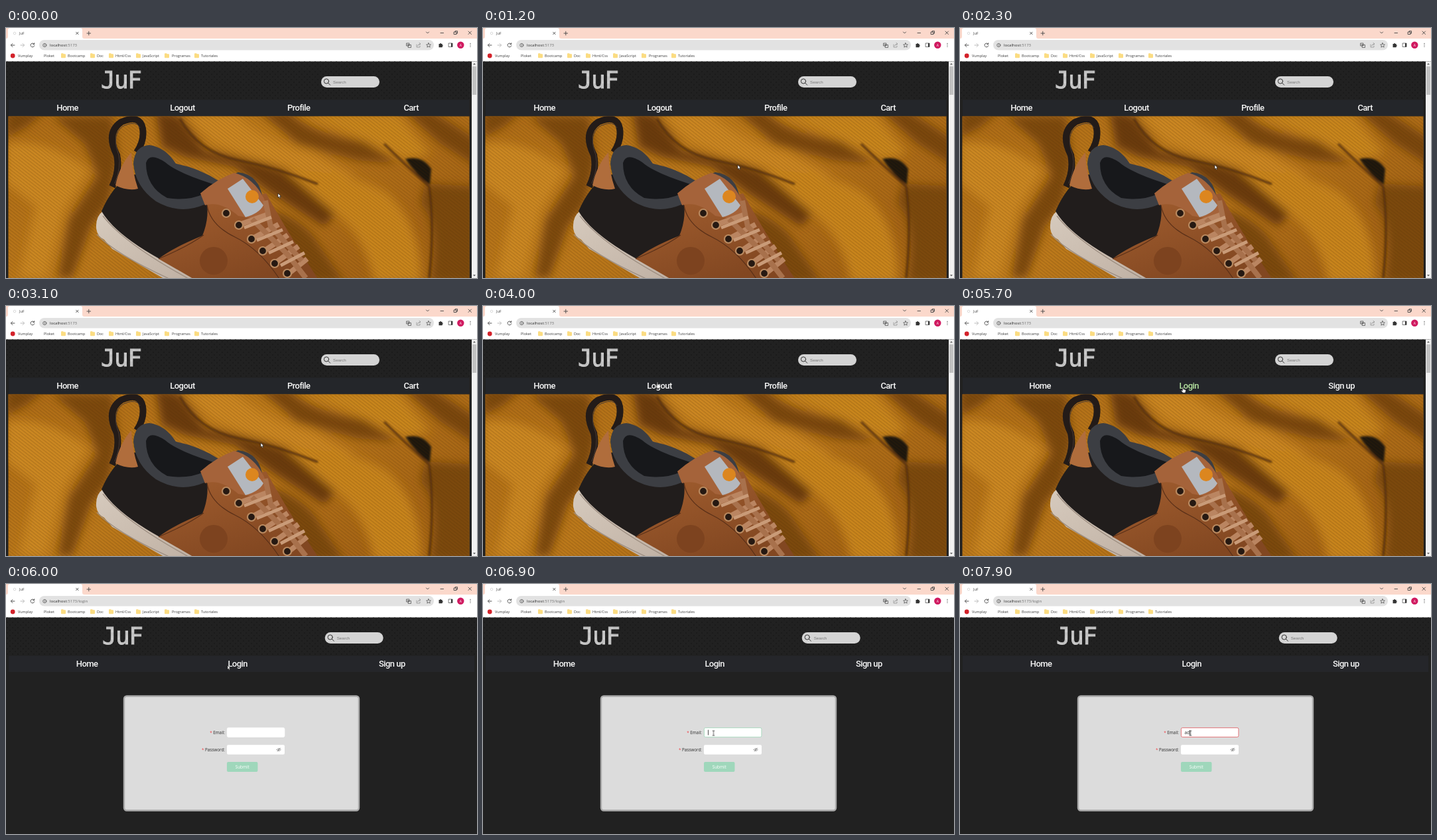
Write an HTML page that moves like this. It is 710x378 px and loops after 8 s.

```html
<!DOCTYPE html>
<html lang="en">
<head>
<meta charset="utf-8">
<title>JuF</title>
<style>
html, body { margin: 0; width: 100%; height: 100%; overflow: hidden; background: #212121; }
svg { display: block; width: 710px; height: 378px; }
text { font-family: "Open Sans", sans-serif; }
.ui { font-size: 5.5px; fill: #3c3c3c; }
.form { font-size: 6.3px; fill: #2b2b2b; }
.brand { font: 36px "DejaVu Sans Mono", monospace; letter-spacing: -1.6px; }
.nav text { font: 500 13px Roboto, sans-serif; letter-spacing: -.55px; fill: #f6f6f6; text-anchor: middle; }
.line { fill: none; stroke: #444; stroke-width: .9; stroke-linecap: round; stroke-linejoin: round; }

.step { animation: 8s step-end infinite; }
.home { animation-name: home; }
.login { animation-name: login; }
.member { animation-name: member; }
.guest { animation-name: guest; }
.arrow { animation-name: arrow; }
.hand { animation-name: hand; }
.beam { animation-name: beam; }
.caret { animation-name: caret; }
.one { animation-name: one; }
.two { animation-name: two; }
.field { animation-name: field; }
.nav .hover { animation: hover 8s step-end infinite; }
.pointer { animation: move 8s linear infinite; }

@keyframes home { 0% { opacity: 1 } 75%, 100% { opacity: 0 } }
@keyframes login { 0% { opacity: 0 } 75%, 100% { opacity: 1 } }
@keyframes member { 0% { opacity: 1 } 55%, 100% { opacity: 0 } }
@keyframes guest { 0% { opacity: 0 } 55%, 100% { opacity: 1 } }
@keyframes hover { 0% { fill: #f6f6f6 } 71.25%, 100% { fill: #b5e3a0 } }
@keyframes arrow {
  0% { opacity: 1 } 48.75% { opacity: 0 } 55% { opacity: 1 }
  71.25% { opacity: 0 } 75% { opacity: 1 } 83.75%, 100% { opacity: 0 }
}
@keyframes hand {
  0% { opacity: 0 } 48.75% { opacity: 1 } 55% { opacity: 0 }
  71.25% { opacity: 1 } 75%, 100% { opacity: 0 }
}
@keyframes beam { 0% { opacity: 0 } 83.75%, 100% { opacity: 1 } }
@keyframes caret { 0% { opacity: 0 } 86.25% { opacity: 1 } 92.5%, 100% { opacity: 0 } }
@keyframes one { 0% { opacity: 0 } 97.5%, 100% { opacity: 1 } }
@keyframes two { 0% { opacity: 0 } 98.75%, 100% { opacity: 1 } }
@keyframes field { 0% { stroke: #fff } 85% { stroke: #a5d8bd } 97.5%, 100% { stroke: #e0676d } }
@keyframes move {
  0%, 1.25% { transform: translate(410px, 250px); animation-timing-function: ease-in-out }
  11.25%, 41.25% { transform: translate(384px, 207px); animation-timing-function: ease-in-out }
  50%, 51.25% { transform: translate(263px, 115px) }
  52.5%, 60% { transform: translate(263px, 117px); animation-timing-function: ease-in-out }
  70%, 74.99% { transform: translate(336px, 122px) }
  75%, 76.25% { transform: translate(334px, 123px); animation-timing-function: ease-in-out }
  85%, 100% { transform: translate(347.5px, 225.5px) }
}
</style>
</head>
<body>
<svg viewBox="0 0 710 378">
<defs>
  <pattern id="dots" width="2.2" height="2.2" patternUnits="userSpaceOnUse">
    <path fill="#777" d="M0 0h2.2v2.2h-2.2z"/><path fill="#fff" d="M.2 .2h1.7v1.7h-1.7z"/>
  </pattern>
  <pattern id="weave" width="8" height="8" patternUnits="userSpaceOnUse">
    <path fill="#191919" d="M1 1h2v2h-2zM5 5h2v2h-2z"/>
  </pattern>
  <pattern id="cord" width="4" height="4" patternUnits="userSpaceOnUse" patternTransform="rotate(38)">
    <path fill="#4a2a04" d="M0 0h4v1.4h-4z"/>
  </pattern>
  <linearGradient id="cloth" x2="1" y2=".5">
    <stop offset="0" stop-color="#ae6c16"/><stop offset=".5" stop-color="#bd7a1b"/>
    <stop offset="1" stop-color="#a66515"/>
  </linearGradient>
  <linearGradient id="leather" x2=".6" y2="1">
    <stop offset="0" stop-color="#a35f30"/><stop offset="1" stop-color="#824721"/>
  </linearGradient>
  <linearGradient id="sole" x2="1" y2="1">
    <stop offset="0" stop-color="#d6cabd"/><stop offset="1" stop-color="#bfb0a3"/>
  </linearGradient>
  <filter id="soft" x="-30%" y="-30%" width="160%" height="160%"><feGaussianBlur stdDeviation="7"/></filter>
  <filter id="fine"><feGaussianBlur stdDeviation="1.5"/></filter>
  <clipPath id="frame"><path d="M3.5 133.5h695v245h-695z"/></clipPath>
  <path id="folder" fill="#fbdc82" d="M0 1q0-1 1-1h2l1 1h2q1 0 1 1v4q0 1-1 1H1q-1 0-1-1z"/>
  <text id="brand" class="brand" x="143" y="91" fill="url(#dots)" stroke="url(#dots)" stroke-width=".9">JuF</text>
  <g id="search">
    <rect x="475" y="73" width="88" height="17" rx="8.5" fill="#d4d4d4"/>
    <g class="line" style="stroke:#222"><circle cx="483" cy="80.5" r="3.6"/><path d="M485.7 83.2l3 3"/></g>
    <text x="493" y="83.6" fill="#777" style="font:6.2px 'Liberation Sans',sans-serif">Search</text>
  </g>
</defs>

<!-- browser -->
<path fill="#fbd8cb" d="M0 0h710v16H0z"/>
<path fill="#fff" d="M0 16q3 0 3-3V3q0-3 3-3h106q3 0 3 3v10q0 3 3 3h592v35H0z"/>
<circle cx="13" cy="8" r="1.8" fill="none" stroke="#ccc" stroke-width=".7"/>
<text class="ui" x="20" y="10">JuF</text>
<g class="line">
  <path d="M105.7 6.2l3.4 3.4m0-3.4l-3.4 3.4M122 8h5.6M124.8 5.2v5.6M633.5 6l2 2 2-2M655 7.5h4.5M697 5l4.5 4.5m0-4.5l-4.5 4.5M675.5 6h3.5v3.5h-3.5zM677 6V4.6h3.5v3.5H679"/>
  <path d="M13 26H7.5m2.4-2.5L7.4 26l2.5 2.5"/>
  <path stroke="#b5b5b5" d="M22 26h5.5m-2.4-2.5l2.5 2.5-2.5 2.5"/>
  <path d="M42.4 24.3a2.9 2.9 0 1 0 .4 2.4M42.7 22.7v2h-2"/>
</g>
<rect x="50" y="18" width="595" height="15.5" rx="7.7" fill="#e2e2e2"/>
<g class="line" style="stroke-width:.7">
  <circle cx="58.3" cy="26" r="2.6"/><path d="M58.3 25.8v1.4M58.3 24.4v.1"/>
  <path d="M604 23h4v4h-4zM606.5 25.5h4v4h-4zM605 25h2"/>
  <path stroke="#888" d="M619 25v4h5v-2M620.5 27q.5-3 4-3m-1.5-1.7l2 1.7-2 1.7"/>
  <path d="M637 22.7l1 2.2 2.4.2-1.8 1.6.6 2.4-2.2-1.3-2.2 1.3.6-2.4-1.8-1.6 2.4-.2z"/>
  <path d="M667.5 23h5.5v5.5h-5.5z"/>
</g>
<path fill="#333" d="M671 23h2v5.5h-2zM652.5 24h1.6a1 1 0 0 1 2 0h1.6v1.7a1 1 0 0 1 0 2v1.5h-5.2z"/>
<circle cx="685.3" cy="25.8" r="5.2" fill="#d01a60"/>
<text x="685.3" y="27.7" text-anchor="middle" font-size="5" fill="#fff">A</text>
<path class="line" style="stroke-width:1.3" d="M700 23.5v.01M700 25.8v.01M700 28.1v.01"/>
<text x="66" y="28.2" font-size="6.1" fill="#2d2d2d">localhost<tspan fill="#6d6d6d">:5173</tspan></text>
<text class="step login" x="107.2" y="28.2" font-size="6.1" fill="#6d6d6d">/login</text>
<circle cx="10.2" cy="42" r="3.4" fill="#d3222a"/>
<use href="#folder" x="83" y="38.3"/><use href="#folder" x="127" y="38.3"/><use href="#folder" x="155" y="38.3"/>
<use href="#folder" x="196" y="38.3"/><use href="#folder" x="239" y="38.3"/><use href="#folder" x="284" y="38.3"/>
<g class="ui">
  <text x="18" y="44">Vumplay</text><text x="57" y="44">Ploket</text><text x="93" y="44">Bootcamp</text>
  <text x="137" y="44">Doc</text><text x="165" y="44">Html/Css</text><text x="206" y="44">JavaScript</text>
  <text x="250" y="44">Programas</text><text x="294" y="44">Tutoriales</text>
</g>

<!-- page -->
<path fill="#212121" d="M0 50.5h710V378H0z"/>
<path fill="url(#weave)" opacity=".75" d="M0 50.5h710V108H0z"/>

<g class="step home">
  <use href="#brand"/><use href="#search"/>
  <path fill="#24262a" d="M4 108.5h694V133H4z"/>
  <g class="nav step member">
    <text x="92.7" y="124.5">Home</text><text x="266" y="124.5">Logout</text>
    <text x="441.2" y="124.5">Profile</text><text x="610.7" y="124.5">Cart</text>
  </g>
  <g class="nav step guest">
    <text x="120.7" y="124.5">Home</text><text class="hover" x="345.2" y="124.5">Login</text>
    <text x="575.2" y="124.5">Sign up</text>
  </g>

  <!-- photo: cloth -->
  <g clip-path="url(#frame)">
    <path fill="url(#cloth)" d="M3 133h696v245H3z"/>
    <g filter="url(#soft)">
      <path fill="#7d480f" d="M70 133L160 133 170 200 155 265 128 300 100 378H78L95 290 138 222 118 175zM0 125H60L30 150 0 165z"/>
      <path fill="#cc8822" d="M0 175Q60 165 125 215L88 275 60 378H20L45 270 0 235z"/>
      <path fill="#6b3a0c" d="M225 125L262 133 300 185 390 205 470 235 500 275 480 300 400 250 345 210 270 195 235 180z"/>
      <path fill="#cc8721" d="M268 130H345Q385 172 460 188L530 225 470 222 375 198 310 172z"/>
      <path fill="#7a470f" d="M380 125H425Q455 160 540 172L590 205 530 200 440 175zM600 125H640L720 175V215L655 175z"/>
      <path fill="#c9861f" d="M450 130H590L640 190 600 198 530 165z"/>
      <path fill="#c9851f" d="M420 215Q520 215 575 250Q628 300 625 385H555Q540 310 490 275z"/>
      <path fill="#7c4810" d="M400 275Q450 290 470 325L510 385H455L400 310zM632 235L710 240V385H640Q655 300 625 265z"/>
    </g>
    <g filter="url(#fine)">
      <path fill="#1f1811" d="M602 198Q628 192 641 213L639 237Q620 224 602 198z"/>
      <path fill="none" stroke="#542d08" stroke-width="3" d="M262 137Q290 188 350 200T470 236M570 175Q600 205 638 240Q646 300 638 378"/>
    </g>
    <path fill="url(#cord)" opacity=".2" d="M3 133h696v245H3z"/>

    <!-- photo: shoe -->
    <path fill="none" stroke="#231b18" stroke-width="10" d="M160 240Q172 215 167 192Q150 158 174 142Q202 130 206 152Q209 170 197 188"/>
    <path fill="none" stroke="#4a3a31" d="M164 235Q174 210 170 192Q158 161 177 148Q197 139 202 151"/>
    <path fill="url(#sole)" d="M146 277Q135 285 136 302Q137 315 148 320L160 334 238 379H300L244 350 176 300z"/>
    <path fill="none" stroke="#9c8d80" stroke-width="1.3" d="M137 312Q165 342 246 379M146 284Q177 325 275 379"/>
    <path fill="#211d1c" d="M186 222Q160 240 144 277Q166 315 246 357L300 330 318 263 220 220z"/>
    <path fill="url(#leather)" d="M303 266L340 262 392 250Q425 310 470 379H282L230 349Q250 333 296 314Q306 290 303 266z"/>
    <path fill="none" stroke="#5a3018" stroke-width="1.3" d="M303 268Q308 298 345 316T412 379M230 349Q275 330 298 313"/>
    <path fill="#b06d3c" d="M189 188Q171 208 165 238Q184 247 199 243Q190 217 189 188z"/>
    <path fill="#3c3e43" d="M192 205Q194 178 216 177Q240 180 256 205Q292 212 322 232L350 218Q382 222 387 258L366 250 330 256 299 267Q262 283 226 262Q195 240 192 205z"/>
    <path fill="#17181b" d="M211 204Q216 187 240 203Q258 219 312 236L322 243 298 251Q274 262 243 257Q211 240 211 204z"/>
    <path fill="#a5633a" d="M293 250Q318 228 344 219Q373 226 389 258L399 293 350 284Q323 261 300 268z"/>
    <path fill="#b4b8be" d="M334 243L357 228 388 268Q382 280 361 286z"/>
    <circle cx="371" cy="255" r="10" fill="#dc861f"/>
    <circle cx="313" cy="352" r="21" fill="#7d431f"/>
    <g fill="none" stroke="#ba8561" stroke-width="8" stroke-linejoin="round">
      <path d="M350 298L397 281M370 319L411 297M389 337L425 313M406 355L441 330M424 373L454 349"/>
      <path d="M391 261L399 300 446 352M371 289L424 342 452 378" stroke="#a8714c"/>
      <path d="M359 302L400 286M378 321L417 305M396 340L433 323M414 359L450 340" stroke="#c99b78" stroke-width="5"/>
    </g>
    <g fill="#261912" stroke="#b98a60" stroke-width="2.2">
      <circle cx="332" cy="280" r="6"/><circle cx="351" cy="298" r="6"/><circle cx="370" cy="319" r="6"/>
      <circle cx="387" cy="337" r="6"/><circle cx="405" cy="356" r="6"/><circle cx="424" cy="371" r="6"/>
    </g>
  </g>

  <path fill="#f1f1f1" d="M702 50.5h8V378h-8z"/>
  <path fill="#c1c1c1" d="M703 58h6v43h-6z"/>
  <path fill="#666" d="M704 55.5h4l-2-2.5zM704 373h4l-2 2.5z"/>
</g>

<g class="step login">
  <use href="#brand" x="2"/><use href="#search" x="5.7"/>
  <path fill="#25262a" d="M4 108.5h702V133H4z"/>
  <g class="nav">
    <text x="122.2" y="124.5">Home</text><text x="349.2" y="124.5">Login</text><text x="581.8" y="124.5">Sign up</text>
  </g>
  <rect x="178" y="169.5" width="354" height="173" rx="4" fill="#dcdcdc" stroke="#a9a9a9" stroke-width="2.4"/>
  <g class="form" text-anchor="end">
    <text x="330" y="227.3"><tspan fill="#f0484d">* </tspan>Email:</text>
    <text x="330" y="253.3"><tspan fill="#f0484d">* </tspan>Password:</text>
  </g>
  <rect class="step field" x="333.4" y="217.4" width="86.5" height="14" rx="2" fill="#fff" stroke-width=".9"/>
  <rect x="333" y="243.3" width="87" height="14.4" rx="2" fill="#fff"/>
  <path class="line" style="stroke:#777;stroke-width:.7" d="M408.3 250.5q3-4 6 0q-3 4-6 0zM409.2 253l4.2-5"/>
  <circle cx="411.3" cy="250.5" r="1" fill="#777"/>
  <rect x="333" y="269" width="46.5" height="15" rx="2" fill="#9fd7bb"/>
  <text x="356.2" y="279" text-anchor="middle" font-size="6.3" fill="#fff">Submit</text>
  <path class="step caret" fill="#222" d="M339 220.5h.8v8h-.8z"/>
  <g class="form">
    <text class="step one" x="338.5" y="227.4">a</text>
    <text class="step two" x="342" y="227.4">d</text>
    <path class="step two" d="M345.9 221h.7v8h-.7z"/>
  </g>
</g>

<g class="pointer">
  <path class="step arrow" fill="#fff" stroke="#111" stroke-width=".6" d="M0 0v6.3l1.5-1.3 1 2.2 1.1-.5-1-2.1h2z"/>
  <path class="step hand" fill="#fff" stroke="#111" stroke-width=".6" d="M-.7.7q.7-1.2 1.4 0v3l3 .7q1 .4.8 1.5l-.8 3.4h-3.7L-2.5 6.3q0-1.2 1-.8l.8.8z"/>
  <path class="step beam line" style="stroke:#222;stroke-width:.7" d="M-1.3-3.5h2.6M0-3.5v7M-1.3 3.5h2.6"/>
</g>
</svg>
</body>
</html>
```
